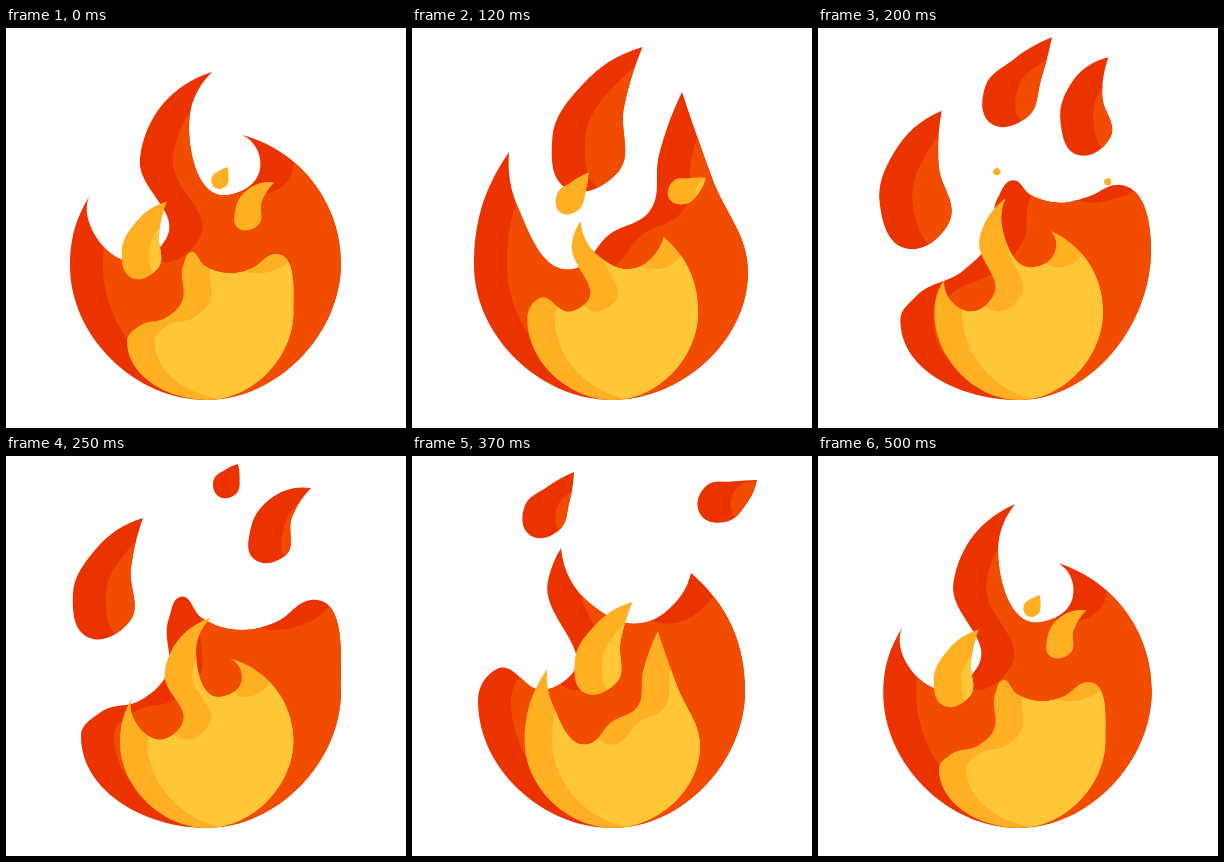
An HTML page with a canvas that plays this animation: 400x400 px, repeating every 0.52 s.

```html
<!DOCTYPE html>
<html lang="en">
<head>
<meta charset="utf-8">
<title>Flame</title>
<style>
html, body { margin: 0; width: 100%; height: 100%; overflow: hidden; background: #fff; }
canvas { display: block; }
</style>
</head>
<body>
<canvas id="stage" width="400" height="400"></canvas>
<script>
const ctx = document.getElementById('stage').getContext('2d');
const LOOP = 520, STEPS = 21, BASE_Y = 372;

// Keys are [step, values]. Body points are "x,y", with "c" after a sharp corner.
const body = (step, text) => [step, text.split(' ').flatMap(p => {
  const [x, y] = p.split(',').map(parseFloat);
  return [x, y, p.endsWith('c') ? 0 : 1];
})];

// Two tongues stretching upwards: left side, left tip, valley, right tip, right side.
const CUP = [
  body(1, '62,239 86,157c 103,203 150,232 200,214 236,190 252,145 242,106c 288,140 337,240'),
  body(3, '59,240 86,143c 103,205 163,246 205,243 240,213 251,160 253,103c 296,147 340,243'),
  body(5, '62,237 97,124c 107,182 161,241 198,206 237,184 247,127 270,64c 300,150 336,244')
];

// Three bumps growing into tongues: left tip, notch, middle tip, valley, right tip.
const CROWN = [
  body(7, '86,298 100,274 150,242 178,210 189,172 204,158 222,170 243,175 270,170 298,163 332,215'),
  body(10, '75,280 95,256 135,244 159,222 163,162 174,141 196,162 236,174 270,166 305,144 335,235'),
  body(13, '62,262 85,237 138,243 157,231 137,155 144,131 172,161 240,180 275,165 299,139c 340,243'),
  body(15, '66,245 85,213 133,234 158,220 136,125 149,92c 180,149 230,167 262,148 279,117c 333,235'),
  body(17, '69,235 84,188c 131,233 158,211 140,115 170,61c 172,108 223,164 258,137 255,108c 330,234'),
  body(21, '64,238 86,164c 134,233 160,211 134,130 206,44c 183,100 222,167 254,141 236,107c 335,235')
];

// Loose drops; values are tip x, tip y, centre x, centre y, radius, bend.
const DROPS = [
  { from: 1, to: 13, keys: [
    [1, [214, 38, 176, 155, 40, -0.55]],
    [3, [226, 28, 173, 160, 41, -0.55]],
    [7, [235, 10, 172, 97, 32, -0.1]],
    [10, [232, 8, 220, 29, 13.5, 0]],
    [13, [233, 7, 233, 10, 3, 0]]] },
  { from: 6, to: 19, keys: [
    [7, [117, 93, 97, 202, 38, -0.35]],
    [10, [137, 62, 95, 153, 31, -0.33]],
    [13, [155, 30, 108, 96, 27, 0]],
    [15, [162, 16, 130, 62, 21, 0]],
    [17, [166, 9, 164, 20, 10, 0]],
    [19, [167, 8, 167, 10, 2, 0]]] },
  { from: 6, to: 19, keys: [
    [7, [283, 28, 270, 110, 28, -0.4]],
    [10, [305, 32, 262, 86, 22, -0.5]],
    [13, [335, 26, 280, 52, 25, 0]],
    [15, [345, 24, 306, 47, 21, 0.1]],
    [17, [343, 25, 337, 33, 10, 0]],
    [19, [342, 26, 341, 28, 2, 0]]] }
];

function valuesAt(keys, step) {
  const next = keys.findIndex(k => k[0] >= step);
  if (next === 0) return keys[0][1];
  const [a, from] = keys[next - 1], [b, to] = keys[next];
  return from.map((v, i) => v + (to[i] - v) * (step - a) / (b - a));
}

// Closed smooth curve. A tangent follows the circle through both neighbours
// unless given; a corner is entered and left along plain arcs.
function curve(points, given = []) {
  const n = points.length, path = new Path2D();
  const sides = points.map(([x, y], i) => {
    const [nx, ny] = points[(i + 1) % n], len = Math.hypot(nx - x, ny - y) || 1e-6;
    return { x: (nx - x) / len, y: (ny - y) / len, len };
  });
  const tangents = sides.map((b, i) => {
    if (given[i]) return given[i];
    const a = sides[(i + n - 1) % n];
    const x = a.x * b.len + b.x * a.len, y = a.y * b.len + b.y * a.len;
    const len = Math.hypot(x, y) || 1;
    return [x / len, y / len];
  });
  const handle = (side, own, far, round) => {
    const dot = 2 * (far[0] * side.x + far[1] * side.y);
    const arc = [dot * side.x - far[0], dot * side.y - far[1]];
    return arc.map((v, c) => (v + (own[c] - v) * round) * side.len * 0.37);
  };
  path.moveTo(points[0][0], points[0][1]);
  points.forEach(([x, y, round], i) => {
    const j = (i + 1) % n, [ex, ey, endRound] = points[j];
    const out = handle(sides[i], tangents[i], tangents[j], round);
    const into = handle(sides[i], tangents[j], tangents[i], endRound);
    path.bezierCurveTo(x + out[0], y + out[1], ex - into[0], ey - into[1], ex, ey);
  });
  path.closePath();
  return path;
}

function bodyPath(step) {
  const values = step >= 1 && step <= 5 ? valuesAt(CUP, step) : valuesAt(CROWN, step || STEPS);
  const points = [[200, BASE_Y, 1]];
  for (let i = 0; i < values.length; i += 3) points.push(values.slice(i, i + 3));
  const given = [[-1, 0], [0, -1]];
  given[points.length - 1] = [0, 1];
  return curve(points, given);
}

function dropPath([tipX, tipY, x, y, r, bend]) {
  const dx = tipX - x, dy = tipY - y, len = Math.hypot(dx, dy);
  const ux = dx / len, uy = dy / len;
  const point = (along, across) => [x + ux * along - uy * across, y + uy * along + ux * across, 1];
  return curve([
    [tipX, tipY, 0],
    point(len / 2, r * (0.65 + bend)),
    point(0, r), point(-r, 0), point(0, -r),
    point(len / 2, r * (bend - 0.65))
  ]);
}

// The lit area is the same outline moved sideways.
function paint(path, shade, light, shift) {
  ctx.save();
  ctx.fillStyle = shade;
  ctx.fill(path);
  ctx.clip(path);
  ctx.translate(shift, 0);
  ctx.fillStyle = light;
  ctx.fill(path);
  ctx.restore();
}

function flame(step, ...look) {
  paint(bodyPath(step), ...look);
  for (const { from, to, keys } of DROPS) {
    if (step >= from && step <= to) paint(dropPath(valuesAt(keys, step)), ...look);
  }
}

function draw() {
  const time = Math.floor(performance.now() % LOOP / 10) * 10;
  const step = Math.floor((time + 5) / 25);
  ctx.fillStyle = '#fff';
  ctx.fillRect(0, 0, 400, 400);
  flame(step, '#eb3300', '#f24c00', 33);

  // The inner flame is the outer one, smaller and half a loop away.
  const scale = 0.64;
  ctx.save();
  ctx.translate(73, BASE_Y * (1 - scale));
  ctx.scale(scale, scale);
  flame((step + (step < 10 ? 10 : 11)) % STEPS, '#ffaf22', '#ffc738', 43);
  ctx.restore();
  requestAnimationFrame(draw);
}
draw();
</script>
</body>
</html>
```
